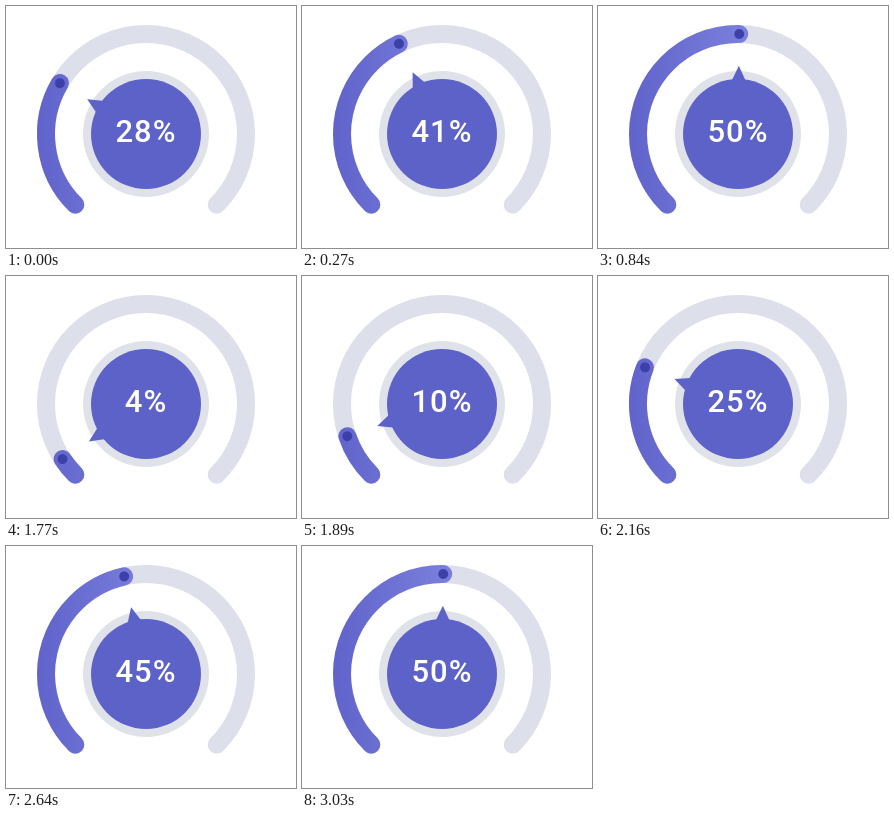
These frames come from a looping animation (290x242 px, 3130 ms). An HTML page:

```html
<!DOCTYPE html>
<html lang="en">
<meta charset="utf-8">
<title>Gauge</title>
<style>
  html, body { margin: 0; width: 100%; height: 100%; overflow: hidden; background: #fff; }
  svg { display: block; }
  .arc { fill: none; stroke-width: 18; stroke-linecap: round; }
  text { font: 500 31px Roboto, Arial, sans-serif; letter-spacing: 1px; fill: #fff; text-anchor: middle; }
</style>
<svg width="290" height="242" viewBox="-140 -128 290 242">
  <linearGradient id="shade" gradientUnits="userSpaceOnUse" x1="-109" x2="10" y1="0" y2="0">
    <stop stop-color="#6064cb"/>
    <stop offset="1" stop-color="#7b7fdc"/>
  </linearGradient>
  <path class="arc" stroke="#dddfea" d="M-70.7 70.7A100 100 0 1 1 70.7 70.7"/>
  <path class="arc" id="bar" stroke="url(#shade)" pathLength="100" d="M-70.7 70.7A100 100 0 1 1 70.7 70.7"/>
  <circle r="63" fill="#e0e2ea"/>
  <g id="hand">
    <path fill="#5d62c9" d="M0-68.3L8.5-50H-8.5Z"/>
    <circle cy="-100" r="5" fill="#3d40a8"/>
  </g>
  <circle r="55" fill="#5d62c9"/>
  <text id="label" y="8"></text>
</svg>
<script>
  const LOOP = 3130, RESTART = 1770, DURATION = 1520, END = 50.3;
  const [bar, hand, label] = ["bar", "hand", "label"].map(id => document.getElementById(id));
  let start;

  // Time held at the last tick; ticks fall on a 30 ms grid
  const hold = (t, tick) => Math.round(Math.floor((t + 24) / tick) * tick / 30) * 30;

  // The loop opens midway through one run and closes with a second run
  const elapsed = t => t < RESTART ? 651 + hold(t, 134) : 200 + hold(t - RESTART, 126);

  // Soft start, longer soft landing
  const ease = u => (1 - (1 - Math.min(u, 1)) ** 2.45) ** 2;

  function draw(now) {
    start ??= now;
    const t = Math.max(0, now - start) % LOOP;
    const value = END * ease(elapsed(t) / DURATION);
    bar.setAttribute("stroke-dasharray", `${value} 200`);
    hand.setAttribute("transform", `rotate(${value * 2.7 - 135})`);
    label.textContent = Math.round(value) + "%";
    requestAnimationFrame(draw);
  }
  draw(performance.now());
</script>
</html>
```
